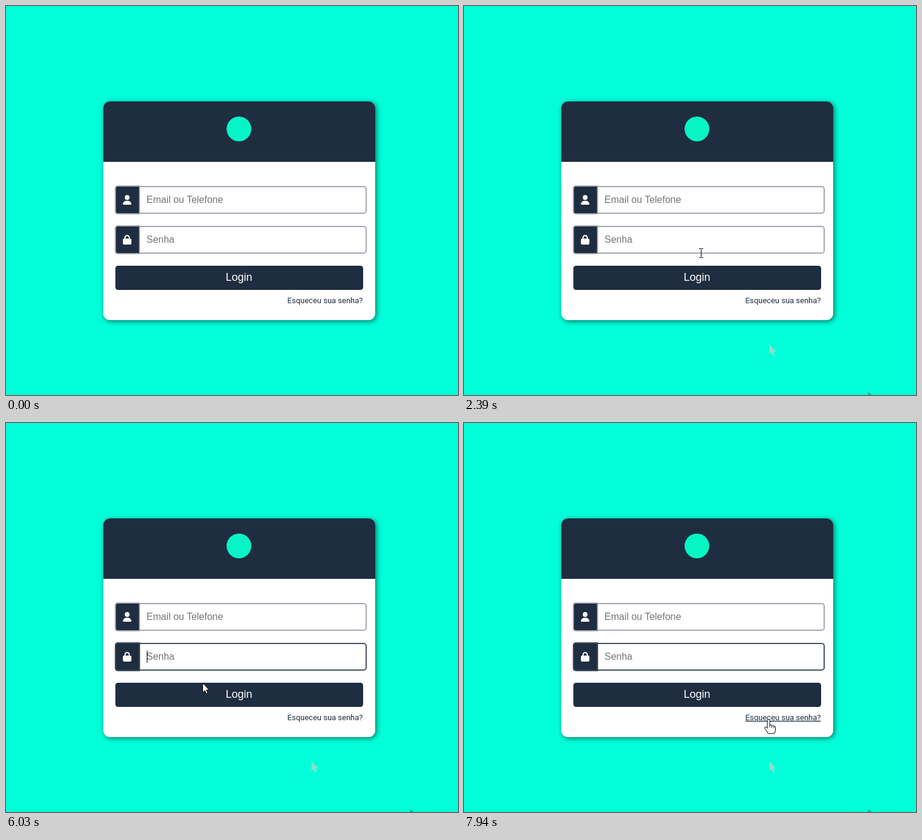
Animation, 748 px wide and 644 px high, one loop 8 s. Source, as an HTML page:

```html
<!DOCTYPE html>
<html lang="pt">
<head>
<meta charset="utf-8">
<title>Login</title>
<style>
html, body { margin: 0; width: 100%; height: 100%; overflow: hidden; background: #00ffd9; }
svg { display: block; }
text { font: 16px "Liberation Sans", Arial, sans-serif; fill: #757575; }
#card { filter: drop-shadow(2px 2px 4px rgba(0, 0, 0, .55)); }
.dark { fill: #1f2d40; }
.white { fill: #fff; }
.border { fill: none; stroke: #a5a8b2; stroke-width: 2; }
.border.focus { stroke: #475161; }
#button.hover { fill: #354253; }
#button + text { font-size: 18px; fill: #fff; }
#link { font: 13px Roboto, sans-serif; fill: #1f2d40; }
#link.hover { text-decoration: underline; }
#pointer path { fill: #fff; stroke: #000; stroke-linejoin: round; }
#pointer #ibeam { fill: none; }
</style>
</head>
<body>
<svg width="748" height="644">
  <defs>
    <path id="arrowShape" d="M.5 .5V16.3L4.1 12.9L6.5 18.4L9 17.3L6.7 12H11.4Z"/>
    <g id="field">
      <path class="dark" d="M221 0H185a4 4 0 0 0-4 4V42a4 4 0 0 0 4 4H221Z"/>
      <path d="M221 1H592a4 4 0 0 1 4 4V41a4 4 0 0 1-4 4H221"/>
    </g>
  </defs>

  <g id="card">
    <rect class="white" x="161" y="158" width="450" height="362" rx="11"/>
    <path class="dark" d="M161 258V169a11 11 0 0 1 11-11H600a11 11 0 0 1 11 11V258Z"/>
  </g>
  <circle cx="385.5" cy="203.5" r="20.5" fill="#06f5c6"/>

  <g transform="translate(0 298)">
    <use href="#field" class="border"/>
    <path class="white" transform="translate(193.5 15) scale(.03125)" d="M224 256A128 128 0 1 0 224 0a128 128 0 1 0 0 256zM178 304C80 304 0 384 0 482c0 17 13 30 30 30H418c17 0 30-13 30-30C448 384 368 304 270 304z"/>
    <text x="232.5" y="28">Email ou Telefone</text>
    <rect class="caret" x="233" y="13" width="1" height="20"/>
  </g>
  <g transform="translate(0 364)">
    <use href="#field" class="border"/>
    <path class="white" transform="translate(193.5 15) scale(.03125)" d="M144 144v48H304V144c0-44-36-80-80-80s-80 36-80 80zM80 192V144C80 64 144 0 224 0s144 64 144 144v48h16c35 0 64 29 64 64V448c0 35-29 64-64 64H64c-35 0-64-29-64-64V256c0-35 29-64 64-64z"/>
    <text x="232.5" y="28">Senha</text>
    <rect class="caret" x="233" y="13" width="1" height="20"/>
  </g>

  <rect id="button" class="dark" x="181" y="430" width="410" height="40" rx="4.5"/>
  <text x="385.5" y="455" text-anchor="middle">Login</text>
  <text id="link" x="590.5" y="492" text-anchor="end">Esqueceu sua senha?</text>

  <path id="speck" d="M669 639L675 644H669Z" fill="#0ba890"/>
  <use id="ghost" href="#arrowShape" x="505" y="560" fill="#8ce0cb"/>

  <g id="pointer">
    <use id="arrow" href="#arrowShape" fill="#fff" stroke="#000"/>
    <path id="ibeam" d="M-3-7.5H0M1-7.5H4M.5-7V7M-3 7.5H0M1 7.5H4"/>
    <path id="hand" d="M-2 13V1.5a2 2 0 0 1 4 0V9q3-1 3.5 1q3-1 3.5 1.2q2.5-.5 2.5 2V17q0 3-2 6H-1q-1-3-5-8q-1.5-2.5 .5-3t3.5 2.5zM2 9v4M5.5 10v3.5M9 11.2v3"/>
  </g>
</svg>
<script>
const LOOP = 8000, STEP = 68;

// pointer stops: time, x, y
const stops = [
  [760, 669, 640], [1510, 598, 607], [1980, 516, 569], [2060, 505, 560],
  [2390, 392, 409], [3140, 312, 321], [3270, 312, 321], [3480, 304, 342],
  [4210, 304, 342], [4550, 299, 381], [5740, 299, 381], [6030, 325, 430],
  [6380, 348, 455], [6590, 348, 455], [6900, 384, 470], [7330, 455, 486],
  [7400, 468, 488], [7940, 504, 491]
];
// caret visible: from, to
const blinks = [[3480, 4010], [4540, 5280], [5810, 6340], [6870, 7400]];

const $ = id => document.getElementById(id);
const show = (el, on) => el.setAttribute("visibility", on ? "visible" : "hidden");
const borders = document.querySelectorAll(".border");
const carets = document.querySelectorAll(".caret");

function pointerAt(t) {
  const i = stops.findIndex(s => s[0] > t);
  if (i < 0) return stops[stops.length - 1].slice(1);
  if (i === 0) return stops[0].slice(1);
  const [t0, x0, y0] = stops[i - 1], [t1, x1, y1] = stops[i];
  const n = Math.max(1, Math.round((t1 - t0) / STEP));
  const u = Math.floor(n * (t - t0) / (t1 - t0)) / n;
  return [Math.round(x0 + (x1 - x0) * u), Math.round(y0 + (y1 - y0) * u)];
}

function draw(t) {
  const [x, y] = pointerAt(t);
  const over = (l, top, r, b) => x > l && x < r && y > top && y < b;
  const onField = over(221, 298, 597, 344) || over(221, 364, 597, 410);
  const onLink = over(465, 480, 591, 497);
  const kind = onField ? "ibeam" : onLink ? "hand" : "arrow";
  const visible = t >= 760;

  $("pointer").setAttribute("transform", `translate(${x} ${y})`);
  for (const id of ["arrow", "ibeam", "hand"]) show($(id), visible && id === kind);
  $("button").classList.toggle("hover", over(181, 430, 591, 470));
  $("link").classList.toggle("hover", onLink);

  const focus = t < 3480 ? -1 : t < 4750 ? 0 : 1;
  const lit = blinks.some(([a, b]) => t >= a && t < b);
  borders.forEach((el, i) => el.classList.toggle("focus", i === focus));
  carets.forEach((el, i) => show(el, lit && i === focus));

  show($("speck"), t >= 830);
  show($("ghost"), t >= 2120);
}

function frame(now) {
  draw(now % LOOP);
  requestAnimationFrame(frame);
}
draw(0);
requestAnimationFrame(frame);
</script>
</body>
</html>
```
